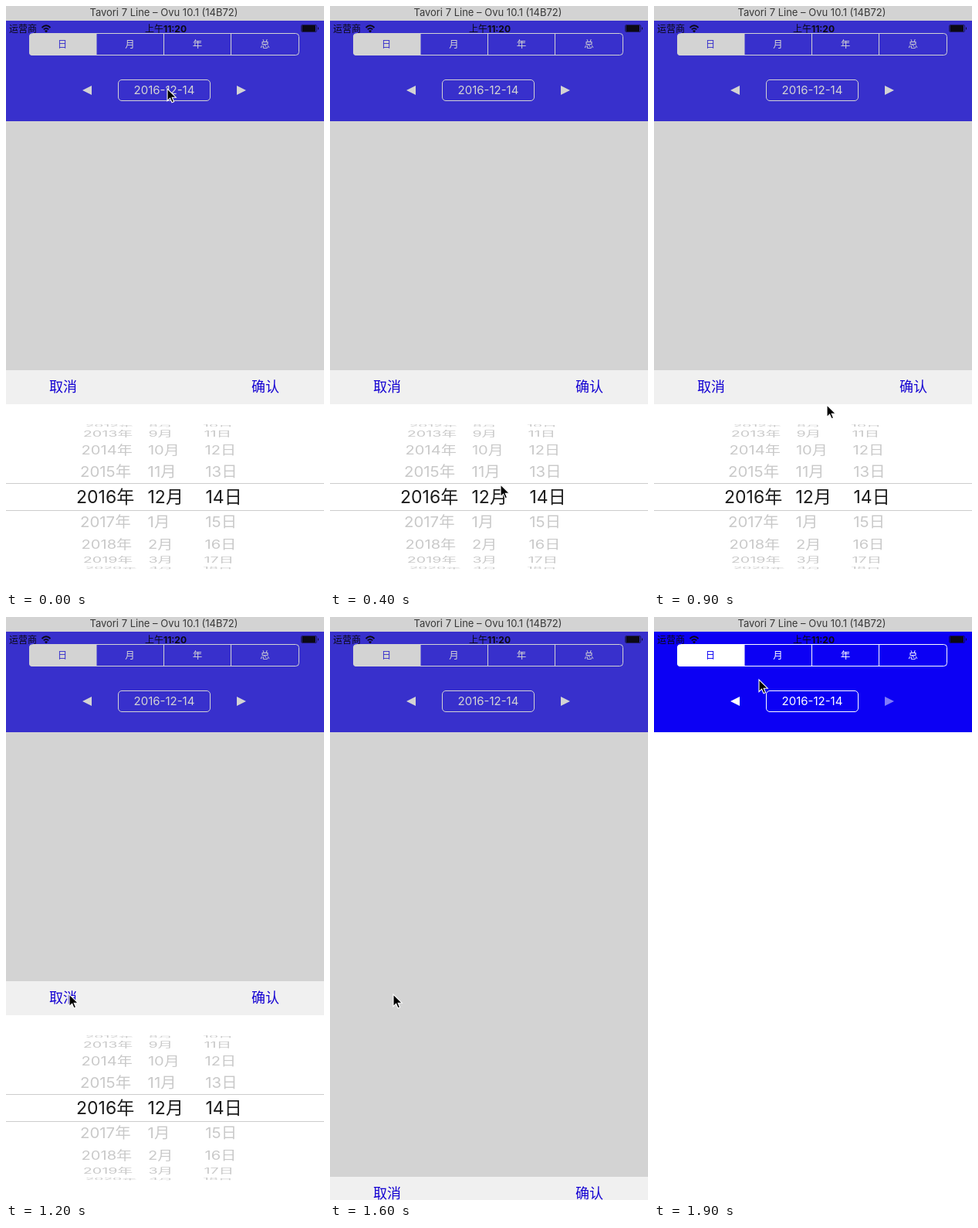
Recreate the animation shown at these times as an HTML page. Size 412 px wide and 754 px high, loop 2000 ms.

```html
<!DOCTYPE html>
<html lang="zh-CN">
<head>
<meta charset="utf-8">
<title>日期选择</title>
<style>
html, body { margin: 0; width: 100%; height: 100%; overflow: hidden; background: #fff; }
svg { display: block; width: 100%; height: 100%; }
text { font-family: Inter, "Noto Sans CJK SC", "Noto Sans CJK", sans-serif; }
.mid { text-anchor: middle; }
</style>
</head>
<body>
<svg viewBox="0 0 412 754" xmlns="http://www.w3.org/2000/svg">
  <defs>
    <clipPath id="wheel"><rect x="0" y="540.5" width="412" height="189"/></clipPath>
    <clipPath id="seg"><rect x="30" y="36" width="350" height="28" rx="4"/></clipPath>
  </defs>
  <rect width="412" height="754" fill="#fff"/>
  <rect y="19" width="412" height="130" fill="#0c00f4"/>
  <rect x="30" y="36" width="87" height="28" fill="#fff" clip-path="url(#seg)"/>
  <g fill="none" stroke="#fff">
    <rect x="30.5" y="35.5" width="349" height="28" rx="4"/>
    <path d="M117 36V63M204.5 36V63M291.5 36V63"/>
    <rect x="145.5" y="95.5" width="119" height="27" rx="4.5"/>
  </g>
  <g id="tabs" font-size="12.5"></g>
  <text class="mid" x="205" y="114.4" font-size="15" fill="#fff">2016-12-14</text>
  <path d="M99 109L111 103V115Z" fill="#fff"/>
  <path id="next" d="M311 109L299 103V115Z" fill="#fff"/>
  <rect id="dim" y="19" width="412" height="735" fill="#858585" opacity=".362"/>

  <g fill="#0b0914" font-size="12">
    <text x="4" y="33.5">运营商</text>
    <text class="mid" x="207" y="33.5">上午<tspan font-weight="700">11:20</tspan></text>
    <g fill="none" stroke="#0b0914" stroke-width="1.8">
      <path d="M46.5 28Q52 22.6 57.5 28M48.8 30.4Q52 27.4 55.2 30.4"/>
    </g>
    <path d="M50 32.2Q52 30.4 54 32.2L52 34.2Z"/>
    <rect x="382.5" y="24.5" width="20" height="9" rx="1.5" fill="none" stroke="#0b0914" stroke-opacity=".6"/>
    <rect x="383.5" y="25" width="17.5" height="8" rx="1"/>
    <path d="M404 27Q406 29 404 31Z"/>
  </g>
  <rect width="412" height="19" fill="#d3d3d3"/>
  <text class="mid" x="204.5" y="13.4" font-size="13" fill="#383838">Tavori 7 Line – Ovu 10.1 (14B72)</text>

  <g id="sheet">
    <rect y="471" width="412" height="283" fill="#fff"/>
    <rect y="471" width="412" height="44" fill="#f0f0f0"/>
    <g class="mid" font-size="18" fill="#1400d2">
      <text x="74" y="499">取消</text>
      <text x="336" y="499">确认</text>
    </g>
    <path d="M0 617.5H412M0 652.5H412" stroke="#cdcdcd"/>
    <g id="rows" clip-path="url(#wheel)"></g>
  </g>
  <path id="cursor" d="M0 0V15.6L3.6 12.2L6 17.8L8.6 16.7L6.2 11.2H11.2Z" fill="#000" stroke="#fff" stroke-width="1.1"/>
</svg>
<script>
const $ = id => document.getElementById(id);
const LOOP = 2000, STEP = 100;

function addText(parent, str, attrs) {
  const el = document.createElementNS("http://www.w3.org/2000/svg", "text");
  for (const k in attrs) el.setAttribute(k, attrs[k]);
  el.textContent = str;
  parent.appendChild(el);
}

["日", "月", "年", "总"].forEach((s, i) =>
  addText($("tabs"), s, { class: "mid", x: 73 + 87.5 * i, y: 53.7, fill: i ? "#fff" : "#0c00f4" }));

// Picker rows lie on a cylinder seen from the front.
const MID_X = 206, MID_Y = 635, RADIUS = 93, TURN = 20.5 * Math.PI / 180;
for (let i = -4; i <= 4; i++) {
  const a = i * TURN, size = i ? 20.5 : 23;
  const sx = 1 - 0.075 * (1 - Math.cos(a));
  const y = MID_Y + RADIUS * Math.sin(a);
  const cells = [
    [i ? 95.5 : 91, 2016 + i + "年"],
    [183.5, (11 + i) % 12 + 1 + "月"],
    [258.5, 14 + i + "日"]
  ];
  for (const [x, s] of cells) addText($("rows"), s, {
    x: x - MID_X, y: size * 0.36, "font-size": size,
    fill: i ? "#c9c9c9" : "#1c1c1c",
    transform: `translate(${MID_X} ${y}) scale(${sx} ${Math.cos(a)})`
  });
}

// Pointer stops: time, x, y
const stops = [
  [0, 209, 107], [400, 221, 619], [600, 222, 639], [900, 224, 516],
  [1200, 82, 488], [1600, 82, 488], [1700, 82, 485], [1900, 136, 81], [2000, 209, 107]
];

function pointer(t) {
  const i = stops.findIndex(s => s[0] > t);
  const [t0, x0, y0] = stops[i - 1], [t1, x1, y1] = stops[i];
  const u = (t - t0) / (t1 - t0), e = u * u * (3 - 2 * u);
  return [x0 + (x1 - x0) * e, y0 + (y1 - y0) * e];
}

function draw(ms) {
  const t = Math.floor(ms % LOOP / STEP) * STEP;
  const open = t < 1700;
  const [x, y] = pointer(t);
  $("cursor").setAttribute("transform", `translate(${x} ${y})`);
  $("sheet").setAttribute("transform", `translate(0 ${t < 1600 ? 0 : open ? 253 : 283})`);
  $("dim").style.display = open ? "" : "none";
  $("next").setAttribute("fill-opacity", open ? 1 : 0.48);
}

const start = performance.now();
function tick() {
  draw(performance.now() - start);
  requestAnimationFrame(tick);
}
tick();
</script>
</body>
</html>
```
